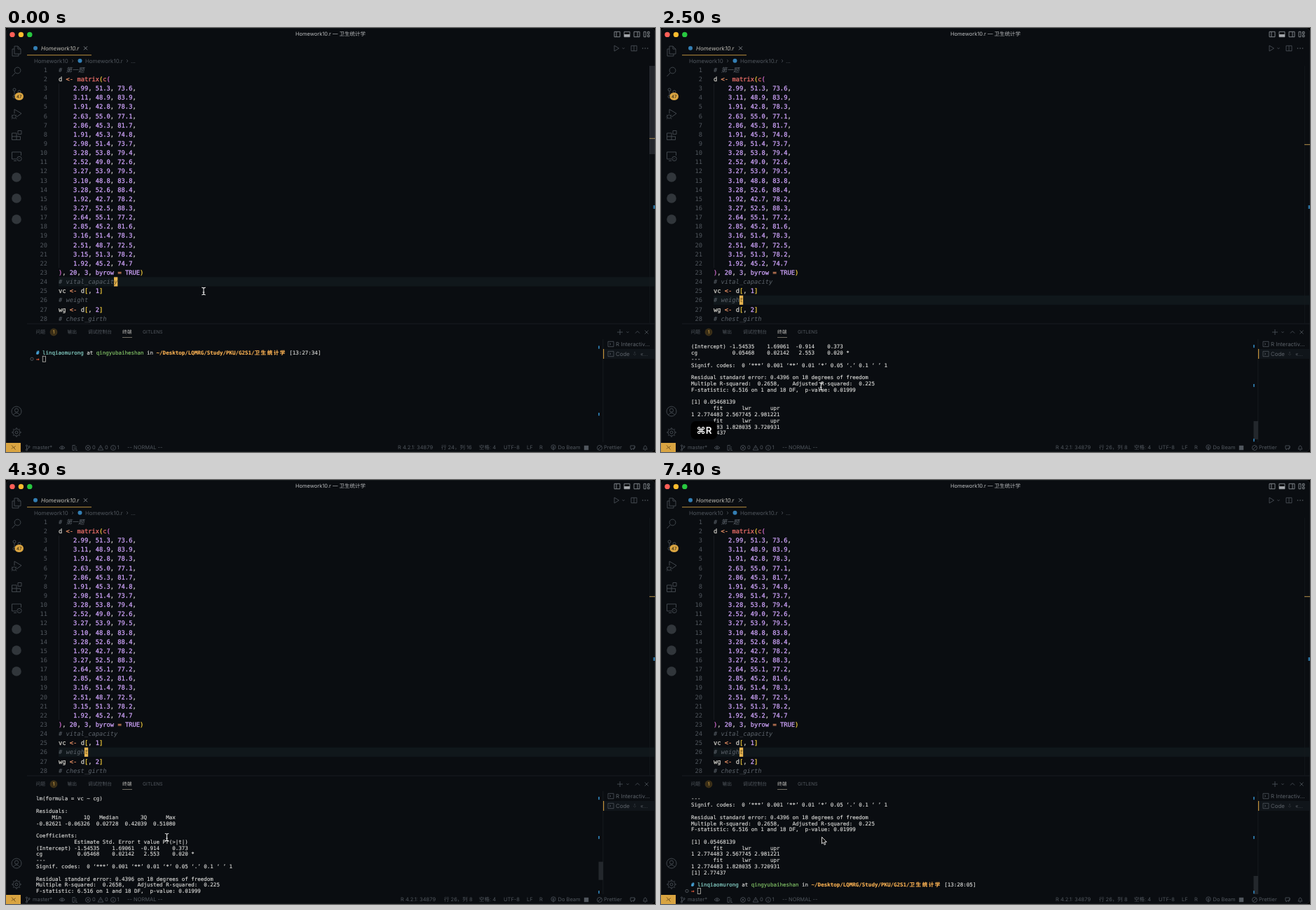
Recreate the animation shown at these times as an HTML page. Size 926 by 605 pixels, loop 7.5 s.

```html
<!DOCTYPE html>
<html lang="zh">
<head>
<meta charset="utf-8">
<title>Homework10.r</title>
<style>
html, body { margin: 0; width: 100%; height: 100%; overflow: hidden; background: #000; }
svg { display: block; }
text { white-space: pre; text-rendering: geometricPrecision; }
.ui { font-family: Inter, 'Noto Sans CJK SC', 'Noto Sans CJK', sans-serif; }
.code, .term { font-family: 'DejaVu Sans Mono', 'Noto Sans CJK SC', 'Noto Sans CJK', monospace; }
.code { font-size: 8.75px; fill: #d2d0c9; stroke: #d2d0c9; stroke-width: .25; }
.term { font-size: 7.5px; fill: #dededc; stroke: #dededc; stroke-width: .12; }
.number { fill: #50565d; stroke: none; }
.cjk { letter-spacing: 1.53px; }
.icon { fill: none; stroke: #40464c; stroke-width: 1; stroke-linejoin: round; }
</style>
</head>
<body>
<svg id="stage" width="926" height="605" viewBox="0 0 926 605"></svg>
<script>
const LOOP = 7500;
const CODE_W = 5.268, CODE_H = 13.14, CODE_X = 75, CODE_Y = 59.8;
const TERM_W = 4.515, TERM_H = 8.78, TERM_X = 43, TERM_Y = 454.7, ROWS = 16;
const GOLD = '#e6b450', DIM = '#50565d', MID = '#5c6269', BLUE = '#2a6f9c', BG = '#0a0d11';

const esc = s => s.replace(/&/g, '&amp;').replace(/</g, '&lt;').replace(/>/g, '&gt;');
const span = (s, fill, extra = '') => `<tspan fill="${fill}" stroke="${fill}" ${extra}>${esc(s)}</tspan>`;
const rect = (x, y, w, h, fill, extra = '') =>
  `<rect x="${x}" y="${y}" width="${w}" height="${h}" fill="${fill}" ${extra}/>`;
const dot = (x, y, r, fill, extra = '') => `<circle cx="${x}" cy="${y}" r="${r}" fill="${fill}" ${extra}/>`;
const icon = (x, y, d, extra = '') => `<path class="icon" transform="translate(${x} ${y})" d="${d}" ${extra}/>`;
// y is the vertical middle of the capitals
const ui = (x, y, s, size = 7.5, fill = DIM, extra = '') =>
  `<text class="ui" x="${x}" y="${y + size * 0.365}" font-size="${size}" fill="${fill}" ${extra}>${esc(s)}</text>`;
const ring = (r, x = 0, y = 0) => `M${x - r} ${y}a${r} ${r} 0 1 1 ${2 * r} 0a${r} ${r} 0 1 1 ${-2 * r} 0`;

// ---------- editor ----------
const source = `# 第一题
d <- matrix(c(
    2.99, 51.3, 73.6,
    3.11, 48.9, 83.9,
    1.91, 42.8, 78.3,
    2.63, 55.0, 77.1,
    2.86, 45.3, 81.7,
    1.91, 45.3, 74.8,
    2.98, 51.4, 73.7,
    3.28, 53.8, 79.4,
    2.52, 49.0, 72.6,
    3.27, 53.9, 79.5,
    3.10, 48.8, 83.8,
    3.28, 52.6, 88.4,
    1.92, 42.7, 78.2,
    3.27, 52.5, 88.3,
    2.64, 55.1, 77.2,
    2.85, 45.2, 81.6,
    3.16, 51.4, 78.3,
    2.51, 48.7, 72.5,
    3.15, 51.3, 78.2,
    1.92, 45.2, 74.7
), 20, 3, byrow = TRUE)
# vital_capacity
vc <- d[, 1]
# weight
wg <- d[, 2]
# chest_girth`.split('\n');

let depth = 0;
function paint(token) {
  if (/[([]/.test(token)) return span(token, depth++ ? '#da70d6' : '#f5cf3c');
  if (/[)\]]/.test(token)) return span(token, --depth ? '#da70d6' : '#f5cf3c');
  if (/^(<-|=)$/.test(token)) return span(token, '#f29668');
  if (/^(matrix|c)$/.test(token)) return span(token, '#f0716b');
  return span(token, '#d2a6ff');
}
function highlight(line) {
  if (line[0] === '#') return span(line, '#5c636b', 'font-style="italic" stroke-width="0"');
  return esc(line).replace(/&lt;-|=|matrix|c(?=\()|byrow|TRUE|\d[\d.]*|[()[\]]/g, s => paint(s.replace('&lt;', '<')));
}
const lineY = n => CODE_Y + (n - 1) * CODE_H;
const editor = source.map((line, i) => {
  const y = lineY(i + 1) + 3.1;
  return `<text class="code number" x="59" y="${y}" text-anchor="end">${i + 1}</text>` +
    `<text class="code" x="${CODE_X}" y="${y}">${highlight(line)}</text>`;
}).join('');

// ---------- terminal ----------
const USER = 'linqiaomurong', HOST = 'qingyubaiheshan', HOME = 'Desktop/LQMRG/Study/PKU/G2S1/', COURSE = '卫生统计学';
const prompt = time => '<tspan font-weight="bold">' + span('# ', '#53bdfa') + '</tspan>' +
  span(USER, '#90e1d6') + ' at ' + span(HOST, '#86c96a') + ' in <tspan font-weight="bold">' +
  span('~/' + HOME, '#ffb454') + span(COURSE, '#ffb454', 'class="cjk"') + `</tspan> [${time}]`;
const arrow = span('→ ', '#f0603f', 'font-weight="bold"');
const command = arrow + span('Rscript ', '#91d076') + span(`"/Users/${USER}/${HOME}`, '#e9c15e') +
  span(COURSE, '#e9c15e', 'class="cjk"') + span('/Homework10/Homework10.r"', '#e9c15e');

const residuals = `     Min       1Q   Median       3Q      Max
-0.82621 -0.06326  0.02728  0.42039  0.51080

Coefficients:
            Estimate Std. Error t value Pr(>|t|)
(Intercept) -1.54535    1.69061  -0.914    0.373
cg           0.05468    0.02142   2.553    0.020 *`;
const report = `
        Pearson's product-moment correlation

data:  vc and cg
t = 2.5527, df = 18, p-value = 0.01999
alternative hypothesis: true correlation is not equal to 0
95 percent confidence interval:
 0.0937963 0.7816626
sample estimates:
      cor
0.5155548


Call:
lm(formula = vc ~ cg)

Residuals:
${residuals}
---
Signif. codes:  0 ‘***’ 0.001 ‘**’ 0.01 ‘*’ 0.05 ‘.’ 0.1 ‘ ’ 1

Residual standard error: 0.4396 on 18 degrees of freedom
Multiple R-squared:  0.2658,    Adjusted R-squared:  0.225
F-statistic: 6.516 on 1 and 18 DF,  p-value: 0.01999

[1] 0.05468139
       fit      lwr      upr
1 2.774483 2.567745 2.981221
       fit      lwr      upr
1 2.774483 1.828035 3.720931
[1] 2.77437
`;
const rows = s => esc(s).split('\n');
const log = [...rows(residuals), '', prompt('13:27:34'), command, ...rows(report), prompt('13:28:05'), arrow];
const COMMAND_ROW = 8, LAST = log.length - 1, BOTTOM = log.length - ROWS;
const commandRow = log.indexOf(command);

// ---------- fixed parts of the window ----------
const activity = [
  [33, 'M-3 -7H2L6 -3V4H-3ZM2 -7V-3H6M-3 -3H-6V7H3V4'],
  [62, ring(4.4, 1.5, -1.5) + 'M-1.6 1.8L-6.5 7'],
  [93, ring(2, -3, -5) + ring(2, -3, 5) + ring(2, 4, -2) + 'M-3 -3V3M4 0Q4 3 -3 3'],
  [123, 'M-3 -1V-7L7 -1L0 4' + ring(2.6, -3.5, 3.5) + 'M-7 1L-6 2M-7.5 4H-6M-7 7L-5.5 5.5M0 1L-1 2M-1 5.5L0 7'],
  [153, 'M-6.5 -3H0V6.5H-6.5ZM-6.5 1.8H5.5V6.5H0M2 -6.5H7V-1.5H2Z'],
  [183, 'M0 4H-6.5V-6H6.5V-1M-4 6.5H0' + ring(3.2, 4, 3.5) + 'M3 2.5L4 3.5L3 4.5'],
  [547, ring(7) + ring(2.6, 0, -1.5) + 'M-4.5 5Q0 -1 4.5 5'],
  [577, ring(5) + ring(2) + 'M0 -7V-5M0 7V5M-7 0H-5M7 0H5M-5 -5L-3.6 -3.6M5 5L3.6 3.6M-5 5L-3.6 3.6M5 -5L3.6 -3.6']
].map(([y, d]) => icon(15, y, d)).join('') + [213, 243, 273].map(y => dot(15, y, 6.8, '#31363b')).join('') +
  rect(12.4, 92.3, 12.6, 10.6, '#d9a441', 'rx="5.3"') + ui(18.7, 97.6, '47', 6, '#15130c', 'text-anchor="middle"');

const light = 'style="stroke:#7d8287"', small = 'style="stroke:#50565d;stroke-width:.8"';
const box = 'M-4 -3.7H4V3.7H-4Z', cross = 'M-2.5 -2.5L2.5 2.5M2.5 -2.5L-2.5 2.5', chevron = 'M-1.5 -.8L0 .8L1.5 -.8';

const titleBar = ['#ff5f57', '#febc2e', '#28c840'].map((c, i) => dot(9 + i * 12.4, 9.4, 3.7, c)).join('') +
  ui(463, 8.7, 'Homework10.r — ' + COURSE, 7.5, '#b9bbbd', 'text-anchor="middle"') +
  icon(872, 9, box + 'M-1 -3.7V3.7', light) + icon(886, 9, box, light) + rect(882, 9, 8, 3.7, '#a4a7ab') +
  icon(900, 9, box + 'M1 -3.7V3.7', light) +
  icon(914, 9, 'M-4 -3.7H-1V3.7H-4ZM1.5 -3.7H4V-.8H1.5ZM1.5 1H4V3.7H1.5Z', light);

const tabs = dot(42, 28.7, 3, '#347fb4') +
  ui(50, 28.6, 'Homework10.r', 8, '#bfbdb6', 'font-style="italic"') +
  icon(113.5, 28.8, cross, light) + rect(30, 38.2, 92, 1, '#b98d3c') +
  icon(871, 29, 'M-3 -4L3.5 0L-3 4Z', small) + icon(881, 29, chevron, small) +
  icon(896, 29, box + 'M0 -3.7V3.7', small) + [908.5, 912, 915.5].map(x => dot(x, 29, .8, MID)).join('') +
  ui(40, 46.8, 'Homework10', 7.9) + icon(95, 47, 'M-1 -2L1 0L-1 2', small) +
  dot(105.5, 46.8, 3, '#347fb4') + ui(113, 46.8, 'Homework10.r', 7.9) +
  icon(173, 47, 'M-1 -2L1 0L-1 2', small) + ui(178, 46.8, '...', 7.9);

const panel = rect(30, 421.5, 896, 1, '#191d22') +
  ui(42.5, 434, '问题', 6.8) + dot(68, 434, 5.4, '#3b2f17') + ui(68, 434, '1', 6.5, GOLD, 'text-anchor="middle"') +
  ui(87.5, 434, '输出', 6.8) + ui(117, 434, '调试控制台', 6.8) +
  ui(166, 434, '终端', 6.8, '#c4c3bf') + rect(166, 441, 14, .8, '#8b8578') +
  ui(195, 434, 'GITLENS', 6.8) +
  icon(876, 434, 'M-4 0H4M0 -4V4', small) + icon(887, 434, chevron, small) +
  icon(901, 434, 'M-3 1.5L0 -1.5L3 1.5', small) + icon(914, 434, cross, small) +
  rect(851.5, 444, .8, 147, '#1a1e23') + rect(852, 458, 74, 14, '#10151a') + rect(852, 458, 1.2, 14, '#c08f3a') +
  [451, 465].map(y => icon(863, y, box + 'M-2 -1.5L0 0L-2 1.5', small)).join('') +
  ui(870, 451, 'R Interactiv...', 7.9, MID) + ui(870, 465, 'Code', 7.9, MID) + ui(894, 465, '⇩', 6) + ui(905, 465, '«...', 7.5);

const statusBar = rect(0, 592, 21, 13, '#d9a441') + icon(10.5, 598.5, 'M-2.5 -3L0 -.5L-2.5 2M3 -2L.5 .5L3 3', 'style="stroke:#70501c"') +
  icon(31, 599, ring(1.1, -1.5, -3) + ring(1.1, -1.5, 3) + ring(1.1, 2, -1.5) + 'M-1.5 -2V2M2 -.5Q1.5 1.5 -1.5 1.5', small) +
  ui(38, 598.7, 'master*') + icon(80, 599, 'M-4 0Q0 -5 4 0Q0 4 -4 0' + ring(1.2), small) +
  icon(98, 599, 'M-3 -3.5H1M-3 -3.5V3.5H0M-1 -1H3M-1 1.5H3M1 3.5H4', small) +
  icon(117, 599, ring(3.5) + 'M-1.5 -1.5L1.5 1.5M1.5 -1.5L-1.5 1.5', small) + ui(123, 598.7, '0') +
  icon(135, 599, 'M0 -3.5L3.8 3.2H-3.8ZM0 -1V1', small) + ui(141, 598.7, '0') +
  icon(153, 599, ring(3.5) + 'M0 -.5V2M0 -2V-1.5', small) + ui(158.5, 598.7, '1') +
  ui(173, 598.7, '-- NORMAL --') + ui(675, 598.7, '空格: 4') + ui(710, 598.7, 'UTF-8') +
  ui(743, 598.7, 'LF') + ui(761, 598.7, 'R') +
  icon(781, 598, ring(3.2) + ring(1) + 'M0 1V4.5', small) + ui(787.5, 598.7, 'Do Beam') +
  rect(824.8, 595.8, 6.4, 6.4, DIM) +
  icon(847, 599, ring(3.5) + 'M-2.4 2.4L2.4 -2.4', small) + ui(853, 598.7, 'Prettier') +
  icon(894, 599, 'M-3 -3H3V1H0L-2 3V1H-3ZM1 3L3.5 -2', small) +
  icon(912, 599, 'M-3 2H3L2 .5V-1Q0 -5 -2 -1V.5ZM-.8 3.3H.8', small);

const $ = id => document.getElementById(id);
$('stage').innerHTML =
  rect(.25, .25, 925.5, 604.5, BG, 'rx="6" stroke="#2b2e32" stroke-width=".5"') +
  titleBar + activity + tabs +
  `<g id="lineMark">${rect(75, -6.6, 851, 13.2, '#10171b')}</g>` +
  rect(75, lineY(3) - 6.6, .7, 20 * CODE_H, '#1d2228') + editor +
  `<g id="caret">${rect(0, -6.6, 5.3, 13.2, GOLD)}<text id="caretChar" class="code" y="3.1" style="fill:#6b5220;stroke:none" font-style="italic"></text></g>` +
  rect(918, 54, .6, 367, '#171b20') + `<rect id="tick" x="918" width="8" height="1.2" fill="#97793f"/>` +
  rect(918, 54, 8, 126, '#7a828c', 'id="editorBar" fill-opacity=".22"') + rect(923.5, 253, 2.5, 5, BLUE) +
  panel + '<g id="term"></g>' + rect(845.5, 0, 6.5, 26, '#23272c', 'id="termBar"') + '<g id="marks"></g>' +
  statusBar + '<g id="position"></g>' +
  `<g id="keys">${rect(42.5, 561, 37.5, 26, '#000', 'rx="7"')}${ui(61.5, 574, '⌘R', 13.5, '#fff', 'font-weight="600" text-anchor="middle"')}</g>` +
  `<path id="beam" d="M-2.7 -5.2Q0 -5.2 0 -3.5Q0 -5.2 2.7 -5.2M0 -3.7V3.7M-2.7 5.2Q0 5.2 0 3.5Q0 5.2 2.7 5.2M-1.3 1.6H1.3" fill="none" stroke="#e4e4e4" stroke-width="1.1"/>` +
  `<path id="pointer" d="M0 0V9.5L2.2 7.5L3.7 11L5.3 10.3L3.8 7H6.8Z" fill="#000" stroke="#f0f0f0" stroke-width=".9"/>`;

// ---------- motion ----------
const CLICK = 300, RUN = 800, DONE = 1500;
const mousePath = [[0, 282, 375.5], [CLICK, 279.5, 387], [1300, 279.5, 387], [1800, 252.5, 435],
  [2300, 228, 511.5], [3600, 229.5, 510], [4600, 229.5, 509.5]];
const scrollPath = [[2400, BOTTOM], [2500, BOTTOM - 2], [3400, 0], [3800, 0], [4500, BOTTOM]];

function along(path, t) {
  const i = path.findIndex(k => k[0] > t);
  if (i < 0) return path[path.length - 1].slice(1);
  if (!i) return path[0].slice(1);
  const [a, b] = [path[i - 1], path[i]], u = (t - a[0]) / (b[0] - a[0]);
  return a.slice(1).map((v, j) => v + (b[j + 1] - v) * u);
}
const show = (id, on) => $(id).setAttribute('visibility', on ? 'visible' : 'hidden');
const move = (id, x, y) => $(id).setAttribute('transform', `translate(${x} ${y})`);

function drawTerminal(top, end, cursorCol) {
  let out = '';
  const circle = (y, done) => dot(37, y, 2.1, done ? BLUE : 'none', `stroke="${done ? BLUE : MID}" stroke-width=".8"`);
  for (let i = top; i < top + ROWS && i <= end; i++) {
    const y = TERM_Y + (i - top) * TERM_H, isCommand = i === commandRow;
    out += `<text class="term" x="${TERM_X}" y="${y + 2.7}">${isCommand && end === i ? arrow : log[i]}</text>`;
    if (isCommand || i === LAST) out += circle(y, isCommand && end === LAST);
    if (i === end) out += rect(TERM_X + cursorCol * TERM_W + .2, y - 4, 4.3, 8, 'none', 'stroke="#bfbdb6" stroke-width=".8"');
  }
  $('term').innerHTML = out;
  $('marks').innerHTML = (end === LAST ? [452, 508, 586] : [453.5, 549]).map(y => rect(845, y, 2, 4.2, BLUE)).join('');
}

let drawn = '';
function frame(now) {
  const t = now % LOOP, clicked = t >= CLICK;
  const line = clicked ? 26 : 24, col = source[line - 1].length;
  const end = t < RUN ? commandRow : t < DONE ? commandRow + 1 : LAST;
  const top = t < DONE ? commandRow - 2 : Math.round(along(scrollPath, t)[0]);

  const key = [line, top, end].join();
  if (key !== drawn) {
    drawn = key;
    drawTerminal(top, end, end === commandRow + 1 ? 0 : 2);
    move('lineMark', 0, lineY(line));
    move('caret', CODE_X + (col - 1) * CODE_W, lineY(line));
    $('caretChar').textContent = source[line - 1][col - 1];
    $('tick').setAttribute('y', clicked ? 165.8 : 157);
    $('termBar').setAttribute('y', 565 - (BOTTOM - top) * 2.03);
    const x = clicked ? 563 : 559;
    $('position').innerHTML = ui(x, 598.7, 'R 4.2.1: 34879') + ui(x + 62, 598.7, `行 ${line}，列 ${col}`);
  }

  show('caret', !clicked || (t - CLICK) % 1000 < 500);
  show('termBar', t >= 2250);
  $('editorBar').setAttribute('opacity', Math.max(0, Math.min(1, (2350 - t) / 400)));
  $('keys').setAttribute('opacity', t < 700 ? 0 : Math.max(0, Math.min(1, (3100 - t) / 300)));

  const [x, y] = along(mousePath, t), isArrow = t >= 4600 || (y > 422 && y < 447);
  move('beam', x, y);
  move('pointer', x, y);
  show('beam', !isArrow);
  show('pointer', isArrow);
  requestAnimationFrame(frame);
}
frame(0);
</script>
</body>
</html>
```
